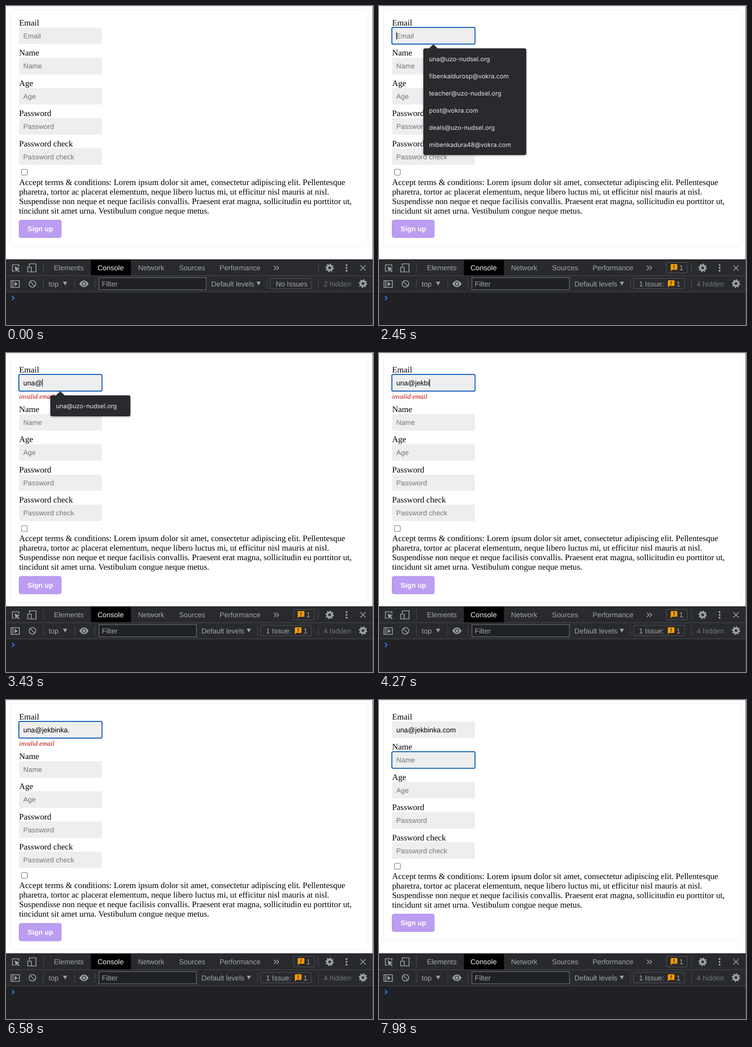
Animation of 770 by 670 pixels, one loop 8000 ms. Source, as an HTML page:

```html
<!DOCTYPE html>
<html lang="en">
<head>
<meta charset="utf-8">
<title>Sign up form</title>
<style>
  html, body { margin: 0; width: 770px; height: 670px; overflow: hidden; background: #fff; }
  svg { display: block; text-rendering: geometricPrecision; }
  .label { font: 17.6px "Liberation Serif", Times, serif; }
  .input { font: 14.67px "Liberation Sans", Arial, sans-serif; }
  .hint { fill: #757575; }
  .error { font: italic 14.08px "Liberation Serif", Times, serif; fill: #c00000; }
  .button { font: bold 14.67px "Liberation Sans", Arial, sans-serif; fill: #fff; }
  .item { font: 12.9px Inter, Roboto, sans-serif; fill: #e8eaed; }
  .tools { font: 15px "Liberation Sans", Arial, sans-serif; fill: #a0a5aa; }
  .line { fill: none; stroke: #9aa0a6; stroke-width: 1.7; }
  .sep { stroke: #4a4d51; stroke-width: 1; }
  .box { fill: none; stroke: #54575b; stroke-width: 1; }
  .ring { fill: none; stroke: #0b58b8; stroke-width: 2; }
  #popup { filter: drop-shadow(0 1px 2px rgba(0, 0, 0, .35)); }
</style>
</head>
<body>
<svg width="770" height="670" viewBox="0 0 770 670">
  <defs>
    <g id="gear" fill="none" stroke="#9aa0a6">
      <circle r="4.9" stroke-width="4.2"/>
      <circle r="7.5" stroke-width="2.8" pathLength="16" stroke-dasharray="1"/>
    </g>
    <g id="alert">
      <path d="M1.5 0H12.5Q14 0 14 1.500V10.500Q14 12 12.500 12H3L0 15V1.500Q0 0 1.500 0Z" fill="#f29900"/>
      <path d="M7 2.200V6.700M7 8.200V10" stroke="#202124" stroke-width="1.8"/>
    </g>
    <path id="down" d="M-4.500 -4H4.500L0 4Z" fill="#9aa0a6"/>
  </defs>

  <rect id="card" x="9.500" y="7.500" width="750" height="497.500" rx="9" fill="#fff" stroke="#ededed"/>
  <g id="head"></g>
  <text id="error" class="error" x="27.500" y="96">invalid email</text>

  <g id="rest">
    <g id="fields"></g>
    <rect x="32.500" y="343" width="12.300" height="12.300" rx="2.500" fill="#fff" stroke="#767676" stroke-width="1.100"/>
    <g class="label">
      <text x="27.500" y="375.700">Accept terms &amp; conditions: Lorem ipsum dolor sit amet, consectetur adipiscing elit. Pellentesque</text>
      <text x="27.500" y="395.700">pharetra, tortor ac placerat elementum, neque libero luctus mi, ut efficitur nisl mauris at nisl.</text>
      <text x="27.500" y="415.700">Suspendisse non neque et neque facilisis convallis. Praesent erat magna, sollicitudin eu porttitor ut,</text>
      <text x="27.500" y="435.700">tincidunt sit amet urna. Vestibulum congue neque metus.</text>
    </g>
    <rect x="27.500" y="449.500" width="88.500" height="37" rx="4" fill="#bb9df1" stroke="#b292ec"/>
    <text class="button" x="72" y="473" text-anchor="middle">Sign up</text>
  </g>

  <rect id="ring" class="ring" x="27" y="45" width="174.500" height="35" rx="2.500"/>
  <text id="typed" class="input" x="36.300" y="68"></text>
  <rect id="caret" width="1.200" height="16"/>

  <g id="popup">
    <path d="M104 90L114 80.500L124 90Z" fill="#282a2d"/>
    <rect id="panel" x="93" y="89" rx="4" fill="#282a2d"/>
    <g id="items" class="item"></g>
  </g>

  <g id="devtools" class="tools">
    <rect y="532" width="770" height="138" fill="#202124"/>
    <rect y="532" width="770" height="68" fill="#292a2d"/>
    <rect x="178" y="533" width="84" height="33" fill="#000"/>
    <path class="sep" d="M0 566.500H770M0 600.500H770M78.500 539V560M655.500 539V560M78.500 573V594M144.500 573V594M186.500 573V594M655.500 573V594"/>

    <path class="line" d="M18 557H13.500V543.500H27V548"/>
    <path d="M18 547L29 551.500L24.500 553.300L28.500 557.500L26.700 559.200L22.700 555L20.500 559Z" fill="#9aa0a6"/>
    <path class="line" d="M49 547V541.500H63V558.500H54M45.500 548.500H53V558.500H45.500Z"/>
    <text x="100.500" y="555">Elements</text>
    <text x="192" y="555" fill="#f1f3f4">Console</text>
    <text x="277" y="555">Network</text>
    <text x="363" y="555">Sources</text>
    <text x="448" y="555">Performance</text>
    <path class="line" d="M562 545.500L566.500 550L562 554.500M567.500 545.500L572 550L567.500 554.500"/>
    <g id="badge">
      <rect class="box" x="603" y="538.500" width="44" height="22" rx="2"/>
      <use href="#alert" x="612" y="542"/>
      <text x="630" y="555">1</text>
    </g>
    <use href="#gear" x="679" y="550"/>
    <g fill="#9aa0a6"><circle cx="714.500" cy="544" r="2"/><circle cx="714.500" cy="550" r="2"/><circle cx="714.500" cy="556" r="2"/></g>
    <path class="line" d="M743.500 544.500L754.500 555.500M754.500 544.500L743.500 555.500"/>

    <path class="line" d="M10.500 577H28V591H10.500ZM14.500 577V591"/>
    <path d="M18 579.500L25 584L18 588.500Z" fill="#9aa0a6"/>
    <circle class="line" cx="55.500" cy="583.500" r="7"/>
    <path class="line" d="M50.500 578.500L60.500 588.500"/>
    <text x="89.500" y="588.500">top</text>
    <use href="#down" x="124" y="583"/>
    <path d="M153.500 583.500Q163.500 569.500 173.500 583.500Q163.500 597.500 153.500 583.500Z" fill="#9aa0a6"/>
    <circle cx="163.500" cy="583.500" r="3.700" fill="#9aa0a6" stroke="#292a2d" stroke-width="1.600"/>
    <rect id="filter" x="195" y="570.500" height="25.500" fill="#202124" stroke="#5f6368" stroke-width="1.500"/>
    <text x="201" y="588.500">Filter</text>
    <g id="levels">
      <text x="430.500" y="588.500">Default levels</text>
      <use href="#down" x="530" y="583"/>
      <path class="sep" d="M548 573V594"/>
      <text id="issues" x="566" y="588.500"></text>
    </g>
    <rect id="issueBox" class="box" y="572" height="22" rx="2"/>
    <g id="issueCount">
      <use href="#alert" x="606" y="576"/>
      <text x="624" y="588.500">1</text>
    </g>
    <text id="hidden" x="666.500" y="588.500" fill="#6f7478"></text>
    <use href="#gear" x="749" y="583"/>
    <path d="M12.500 609L17 613.200L12.500 617.400" fill="none" stroke="#367cf1" stroke-width="2"/>
  </g>

  <path d="M769.500 0V670" stroke="#5b5b5b"/>
  <path d="M0 .5H769" stroke="#dadada"/>

  <path id="arrow" d="M0 0V15L3.500 11.800L6 17.300L8.300 16.300L5.900 11H10.700Z" fill="#000" stroke="#fff"/>
  <g id="beam" fill="none">
    <path id="beamPath" d="M-3.500 -7.500Q0 -7.500 0 -5Q0 -7.500 3.500 -7.500M0 -5V5M-3.500 7.500Q0 7.500 0 5Q0 7.500 3.500 7.500M-2 2.500H2" stroke="#fff" stroke-width="3"/>
    <use href="#beamPath"/>
    <path d="M-3.500 -7.500Q0 -7.500 0 -5Q0 -7.500 3.500 -7.500M0 -5V5M-3.500 7.500Q0 7.500 0 5Q0 7.500 3.500 7.500M-2 2.500H2" stroke="#111" stroke-width="1.200"/>
  </g>
</svg>
<script>
  const LOOP = 8000, TICK = 70, SHIFT = 19.5, PITCH = 63.4;
  const EMAIL = 'una@jekbinka.com';
  const SUGGESTIONS = [
    'una@uzo-nudsel.org', 'fibenkaldurosp@vokra.com', 'teacher@uzo-nudsel.org',
    'post@vokra.com', 'deals@uzo-nudsel.org', 'mibenkadura48@vokra.com'
  ];
  // Time at which each letter of the address appears
  const KEYS = [2520, 2660, 2730, 3430, 3640, 3850, 3990, 4130, 4270, 4410, 4830, 5390, 5880, 6790, 6930, 7070];
  // Spans in which the caret is lit
  const LIT = [[1470, 1960], [2450, 3220], [3430, 5320], [5390, 6440], [6790, 7910]];
  const FOCUS = 1470, ISSUE = 1540, OPEN = 2380, NEXT = 7350;

  const $ = id => document.getElementById(id);
  const show = (id, on) => $(id).setAttribute('visibility', on ? 'visible' : 'hidden');
  const set = (id, attrs) => {
    for (const name in attrs) $(id).setAttribute(name, attrs[name]);
  };
  const move = (id, x, y) => set(id, { transform: `translate(${x} ${y})` });
  const write = (id, text) => { if ($(id).textContent !== text) $(id).textContent = text; };
  const within = (t, a, b) => t >= a && t < b;

  const field = (name, i) => {
    const y = i * PITCH;
    return `<text class="label" x="27.500" y="${41 + y}">${name}</text>
      <rect x="27.500" y="${45.5 + y}" width="173.500" height="34.500" rx="1.500" fill="#eee"/>
      <text class="input hint" id="hint${i}" x="36.300" y="${68 + y}">${name}</text>`;
  };
  const names = ['Email', 'Name', 'Age', 'Password', 'Password check'];
  $('head').innerHTML = field(names[0], 0);
  $('fields').innerHTML = names.slice(1).map((name, i) => field(name, i + 1)).join('');
  $('items').innerHTML = SUGGESTIONS.map(s => `<text x="105">${s}</text>`).join('');

  function drawPopup(t) {
    const open = within(t, OPEN, KEYS[4]);
    show('popup', open);
    if (!open) return;
    const rows = t < KEYS[0] ? [0, 1, 2, 3, 4, 5] : t < KEYS[2] ? [0, 2, 4] : [0];
    set('panel', { width: rows.length > 1 ? 216 : 168, height: rows.length * 36 + 8 });
    [...$('items').children].forEach((item, i) => {
      const row = rows.indexOf(i);
      item.setAttribute('display', row < 0 ? 'none' : 'inline');
      item.setAttribute('y', 116 + row * 36);
    });
  }

  function drawForm(t) {
    const count = KEYS.filter(k => t >= k).length;
    const invalid = count > 0 && count < 15;
    const shift = invalid ? SHIFT : 0;
    const row = t >= NEXT ? PITCH : 0;

    write('typed', EMAIL.slice(0, count));
    show('hint0', !count);
    show('error', invalid);
    move('rest', 0, shift);
    set('card', { height: 497.5 + shift });

    show('ring', t >= FOCUS);
    move('ring', 0, row);
    const end = count && !row ? $('typed').getComputedTextLength() : 0;
    set('caret', { x: 36.3 + end, y: 54.5 + row });
    show('caret', LIT.some(([a, b]) => within(t, a, b)));
  }

  function drawTools(t) {
    const dx = t < FOCUS ? 0 : t < ISSUE ? -35 : -20.5;
    set('filter', { width: 225 + dx });
    move('levels', dx, 0);
    set('issueBox', { x: 554.5 + dx, width: 86.5 - dx });
    write('issues', t < ISSUE ? 'No Issues' : '1 Issue:');
    show('issueCount', t >= FOCUS);
    show('badge', t >= ISSUE);
    write('hidden', `${t < 210 ? 2 : t < 350 ? 3 : 4} hidden`);
  }

  function drawPointer(t) {
    const p = Math.min(1, Math.max(0, (t - 420) / 630));
    const ease = 1 - (1 - p) ** 2;
    const x = 60 + 48 * ease, y = -6 + 66.5 * ease;
    const on = within(t, 490, OPEN), inField = y > 45;
    move('arrow', x, y);
    move('beam', x, y);
    show('arrow', on && !inField);
    show('beam', on && inField);
  }

  const start = performance.now();
  function frame() {
    const now = (performance.now() - start) % LOOP;
    const t = Math.floor(now / TICK) * TICK;
    drawForm(t);
    drawPopup(t);
    drawTools(t);
    drawPointer(t);
    requestAnimationFrame(frame);
  }
  frame();
</script>
</body>
</html>
```
